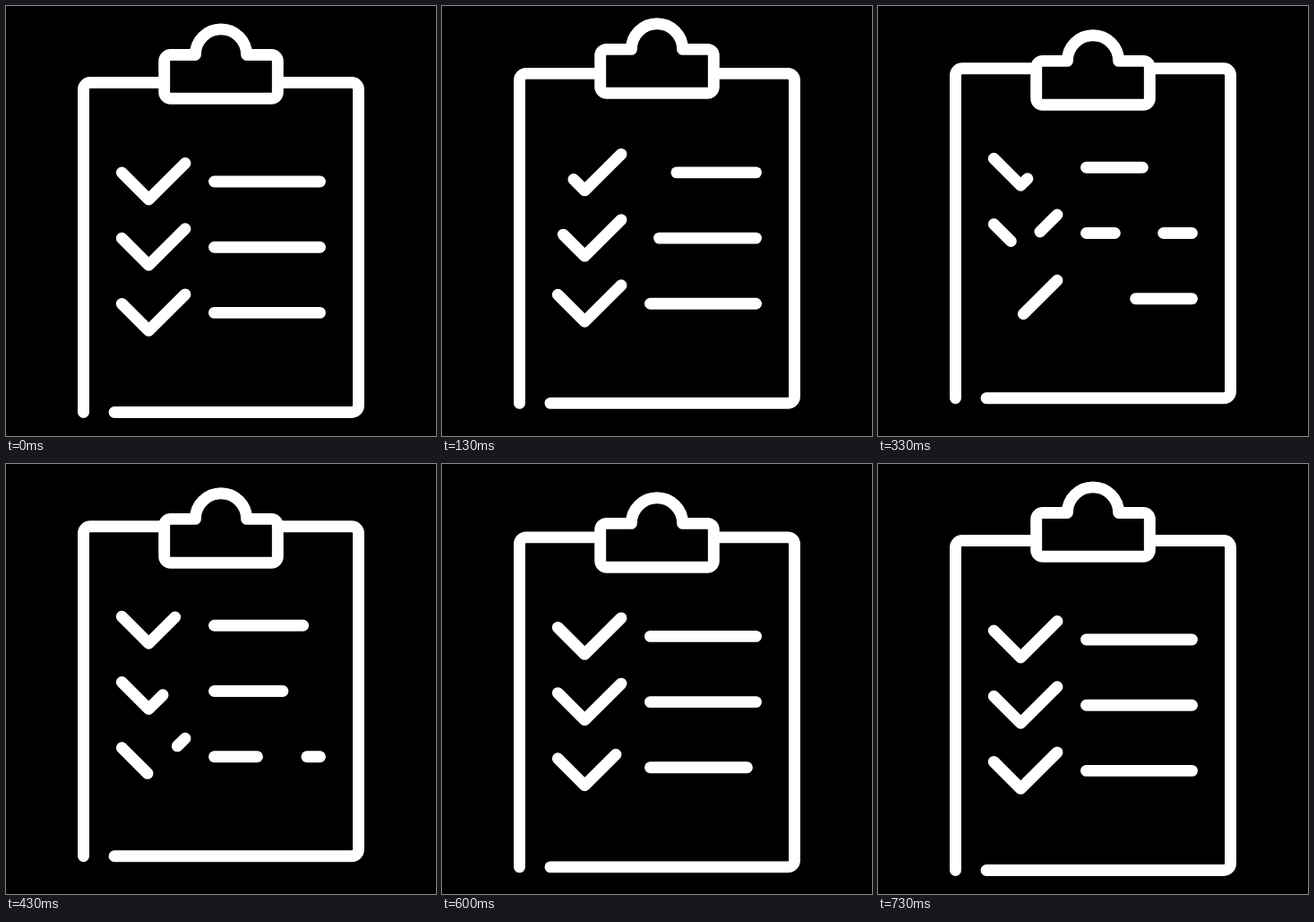
Recreate the animation shown at these times as an HTML page. Size 480 px wide and 480 px high, loop 1530 ms.

```html
<!DOCTYPE html>
<html lang="en">
<head>
<meta charset="utf-8">
<title>Checklist</title>
<style>
  html, body { margin: 0; width: 100%; height: 100%; overflow: hidden; background: #000; }
  svg { display: block; width: 100%; height: 100%; }
  path { fill: none; stroke: #fff; stroke-width: 12.9; stroke-linecap: round; stroke-linejoin: round; }
</style>
</head>
<body>
<svg viewBox="0 0 480 480">
  <g id="board">
    <path d="M86.5 453.5V93a7.5 7.5 0 0 1 7.5 -7.5H176.7"/>
    <path d="M303.3 85.5H386a7.5 7.5 0 0 1 7.5 7.5V446a7.5 7.5 0 0 1 -7.5 7.5H121"/>
  </g>
  <path id="clip" d="M211.4 54.5a28.6 28.6 0 0 1 57.2 0H296.3a7 7 0 0 1 7 7V96.3a7 7 0 0 1 -7 7H183.7a7 7 0 0 1 -7 -7V61.5a7 7 0 0 1 7 -7Z"/>
</svg>
<script>
const LOOP = 1530, LAST = 22, ROWS = 3, ROW_GAP = 73.2, ROW_DELAY = 2;
const LIFT = 15.7, DROP = 22.6;
const board = document.getElementById('board');
const clip = document.getElementById('clip');

// Progress from a to b, held at both ends
const ramp = (a, b, k) => Math.min(1, Math.max(0, (k - a) / (b - a)));
const smooth = x => x * x * (3 - 2 * x);
const easeIn = (x, power = 1.55) => x ** power;
const easeOut = x => 1 - easeIn(1 - x);

function addPath(d) {
  const p = document.createElementNS('http://www.w3.org/2000/svg', 'path');
  p.setAttribute('d', d);
  p.setAttribute('pathLength', 1);
  return board.appendChild(p);
}

// Shows only the part of a path between two fractions of its length
function show(p, from, to) {
  p.style.display = to > from ? '' : 'none';
  p.style.strokeDasharray = `${to - from} 2`;
  p.style.strokeDashoffset = -from;
}

const rows = Array.from({ length: ROWS }, (_, i) => {
  const y = i * ROW_GAP;
  const shapes = [`M129.3 ${186 + y}l30 30l40.7 -40.5`, `M232.5 ${196 + y}H350.5`];
  return { heads: shapes.map(addPath), tails: shapes.map(addPath) };
});

function render(t) {
  // 30 steps per second, rounded to hundredths of a second
  const k = Math.min(LAST, Math.floor((Math.floor(t / 10) * 3 + 1) / 10));
  const lift = LIFT * (smooth(ramp(13.8, 19.9, k)) - smooth(ramp(0, 6.7, k)));
  const drop = DROP * (smooth(ramp(2.1, 9.2, k)) - easeIn(ramp(12.9, LAST, k), 2));
  board.setAttribute('transform', `translate(0 ${lift})`);
  clip.setAttribute('transform', `translate(0 ${lift + drop})`);
  rows.forEach(({ heads, tails }, i) => {
    const local = k - i * ROW_DELAY;
    const erased = easeIn(ramp(0, 9.8, local));
    const drawn = easeOut(ramp(6.2, 16, local));
    heads.forEach(p => show(p, 0, drawn));
    tails.forEach(p => show(p, erased, 1));
  });
}

const start = performance.now();
function tick() {
  render((performance.now() - start) % LOOP);
  requestAnimationFrame(tick);
}
tick();
</script>
</body>
</html>
```
